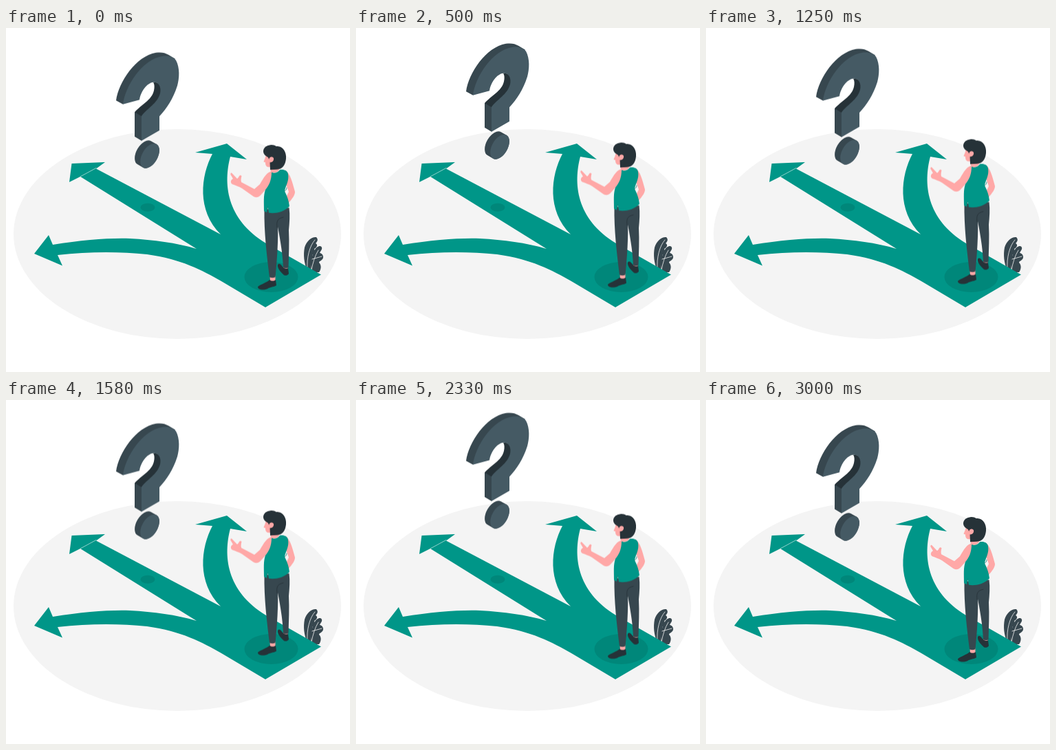
Write an HTML page that moves like this. It is 500 by 500 pixels and loops after 3040 ms.

```html
<!DOCTYPE html>
<html lang="en">
<head>
<meta charset="utf-8">
<title>Choosing a path</title>
<style>
  html, body { margin: 0; width: 100%; height: 100%; overflow: hidden; background: #fff; }
  svg { display: block; width: 100vw; height: 100vh; }

  .teal { fill: #009688; }
  .shade { fill: #00877a; }
  .face { fill: #455a64; }
  .side { fill: #37474f; }
  .ink { fill: #263238; }
  .skin { fill: #ffa8a7; }
  .line { fill: none; stroke-linecap: round; stroke-linejoin: round; }

  .mark { animation: float 760ms linear -33ms infinite alternate; --rise: -20px; }
  .person { animation: float 1520ms linear -33ms infinite alternate; --rise: -10px; }
  @keyframes float {
    from { transform: translateY(0); }
    to { transform: translateY(var(--rise)); }
  }
</style>
</head>
<body>
<svg viewBox="0 0 500 500">
  <ellipse cx="249" cy="299.5" rx="238" ry="152.5" fill="#f4f4f4"/>

  <g id="plant">
    <path class="side" d="M438 352C433 342 432 329 434 319C437 309 445 303 451 304C454 307 453 310 450 313C454 315 452 319 448 321C450 325 448 328 445 330C447 335 443 345 443 352Z"/>
    <path class="side" d="M444 355C443 344 443 332 448 324C451 317 458 315 459 319C460 322 457 324 456 327C461 328 463 334 459 337C457 339 455 339 455 341C459 345 458 351 455 355Z"/>
    <path class="line" stroke="#f4f4f4" stroke-width=".8" d="M438 350C437 334 441 317 449 308M444 352C446 341 449 331 454 323M445 336L459 332"/>
  </g>

  <g id="paths">
    <path class="teal" d="M41 328L62 301L68 315C112 308 150 305 180 306C215 308 247 312 277 321L108 216L92 224L95.500 197L144 195L131 204.500L312 300C277 265 283 215 300 183L275 181L321 168L350 191L326 187C316 225 319 277 378 313L458 358.500L377 406L313 368C285 352 255 336 205 329C165 325 120 325 75 330L82 345.500Z"/>
    <path class="line" stroke="#b2dfdb" stroke-width=".8" d="M108 216L131 203.500"/>
    <ellipse class="shade" cx="206" cy="260.800" rx="10.500" ry="6"/>
    <ellipse class="shade" cx="385.500" cy="362" rx="39" ry="22"/>
  </g>

  <g class="mark" id="question">
    <g transform="translate(0 .8)">
      <path class="side" d="M160 105.500C164 78 189 41 218 36C226 35 231 36 236 39L246 45L228 60L185 90L170 111Z"/>
      <path class="side" d="M187 122L197 127L198 163L197 164L187 158Z"/>
      <path class="ink" d="M214 79C223 78 227 86 225 96C221 111 206 118 198 129L187 122.500C196 112 212 105 215 91C216 86 216 82 214 79Z"/>
      <path class="face" d="M170 111C173 85 198 45 228 41C236 40 243 42 247 47C253 58 252 73 249 84C243 103 233 118 223 128.500L223 149L197 164L197 128C205 117 220 110 224 95C226 86 222 78 214 79C205 80 196 92 194 104.500Z"/>
      <g transform="matrix(.866 -.5 0 1 209 186)">
        <path class="line" stroke="#37474f" stroke-width="32" d="M0 0L-9.300-9.300"/>
        <circle class="face" r="16"/>
      </g>
    </g>
  </g>

  <g class="person" id="woman">
    <g transform="translate(0 .2)">
      <path class="skin" d="M403 345H409.500V352H403ZM383.500 360H391.500V369H384Z"/>
      <path class="ink" d="M395 344C397 341 400 344 402 347C405 350 408 350 410 349L411 357C409 360 406 360 404 359C401 356 394 350 395 344Z"/>
      <path class="ink" d="M366 376C371 372 379 370 383 366C386 368 389 368 392 366L393 374C388 377 384 376 380 379C375 381 366 381 366 376Z"/>

      <path class="side" d="M393 264L411.500 261C413 272 412 283 411 294C412 312 411 330 410.500 348Q407 350 403 348C402 326 398 304 394 284Z"/>
      <path class="side" d="M375.500 263L404 264C400 271 395 274 395 282C396 309 394 336 391.500 362Q387 364 383 362C379 329 375 297 375.500 263Z"/>
      <path class="line" stroke="#263238" stroke-width=".8" d="M394 290C393 281 394 277 403 275"/>

      <path class="skin" d="M406 207C413 211 416 223 420 238C420 243 416 248 411 254L406 248L411 238L406 224Z"/>
      <path class="skin" d="M387 208C379 209 375 217 369 227L361 234L342 224C341 221 342 217 342.500 215C341 213 339 214 338 217L336 219L328 210.500C326 210 326 213 327 214L330 219C326 221 326 225 329 227C334 229 338 230 343 233L360 245C364 247 367 246 370 243L388 223Z"/>
      <path class="teal" d="M386 209C391 212 396 209 398 206C404 205 409 207 410 212C412 222 406 230 405 237C409 245 411 251 412 259C404 268 390 270 382 268.500L380.500 260L379 268L375 266C375 252 374 244 377 235C382 229 386 222 386 209Z"/>
      <path class="line" stroke="#00796b" stroke-width=".8" d="M380.500 260L379 267M405 237C407 236 408 234 408 232"/>

      <path class="skin" d="M378 184C377 188 376 191 374.500 194C375 195 376 195 377 195C377 199 378 203 384 202L385 209C389 212 395 210 397 206L398 184Z"/>
      <path class="ink" d="M378 186C371 181 374 172 382 170.500C386 169 390 170 393 172C402 171 408 180 407 190C406 199 402 205 394 205.500L384 206L383.500 194L381 188Z"/>
      <path class="skin" d="M382 192C382 187 387 186 389 189C390 193 386 196 383 195Z"/>
    </g>
  </g>
</svg>
</body>
</html>
```
